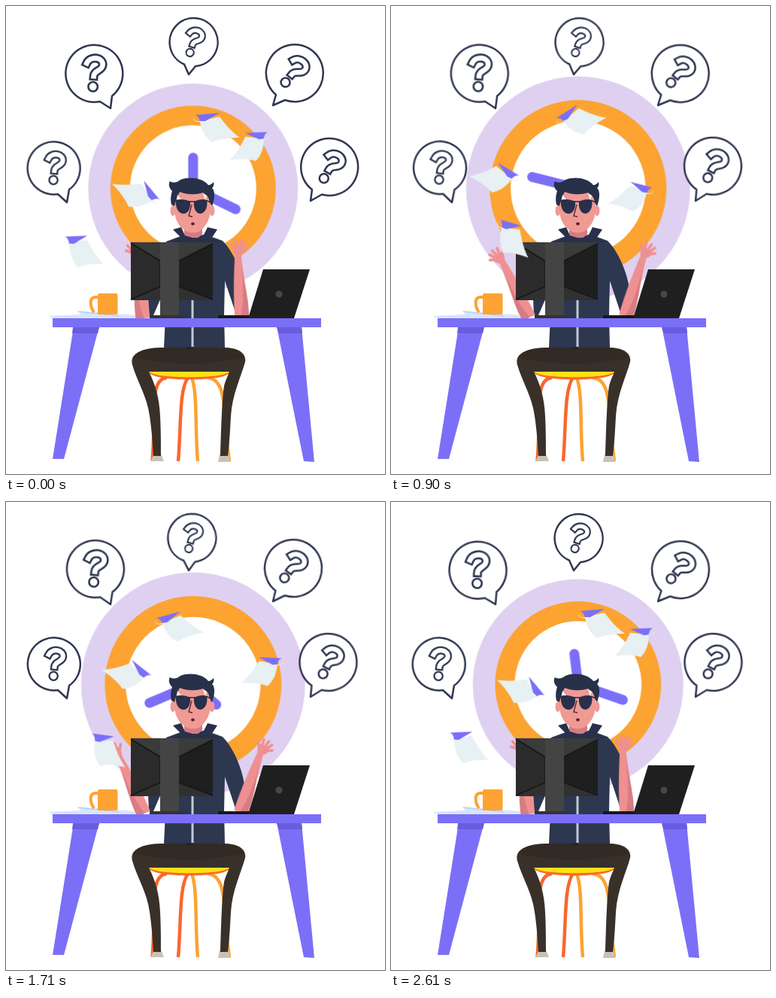
Write an HTML page without scripts that moves like this. It is 504x622 px and loops after 2.7 s.

```html
<!DOCTYPE html>
<html lang="en">
<head>
<meta charset="utf-8">
<title>Overworked at the desk</title>
<style>
html, body { margin: 0; width: 100%; height: 100%; overflow: hidden; background: #fff; }
svg { display: block; width: 504px; height: 622px; }

/* Seven poses per part, held in 90 ms steps */
@keyframes pose {
  0% { transform: var(--a); animation-timing-function: steps(4); }
  13.3333% { transform: var(--b); animation-timing-function: steps(6); }
  33.3333% { transform: var(--c); animation-timing-function: steps(5); }
  50% { transform: var(--d); animation-timing-function: steps(4); }
  63.3333% { transform: var(--e); animation-timing-function: steps(6); }
  83.3333% { transform: var(--f); animation-timing-function: steps(4); }
  96.6667% { transform: var(--g); animation-timing-function: steps(1); }
  100% { transform: var(--a); }
}
.move { animation: pose 2700ms infinite; }

.ring {
  --a: scale(1); --b: scale(1.063); --c: scale(1.068); --d: scale(1);
  --e: scale(1.068); --f: scale(1.07); --g: scale(1.004);
}
.hands {
  --a: rotate(0deg); --b: rotate(41deg); --c: rotate(168deg); --d: rotate(414deg);
  --e: rotate(491deg); --f: rotate(634deg); --g: rotate(713deg);
  stroke: #7b6ff8; stroke-width: 13; stroke-linecap: round;
}
.arm-right {
  --a: rotate(-4deg); --b: rotate(1deg); --c: rotate(16deg); --d: rotate(24deg);
  --e: rotate(18deg); --f: rotate(3deg); --g: rotate(-4deg);
}
.arm-left {
  --a: rotate(-5deg); --b: rotate(-11deg); --c: rotate(-25deg); --d: rotate(-32deg);
  --e: rotate(-23deg); --f: rotate(-13deg); --g: rotate(-5deg);
}

.sheet-top {
  --a: translate(280px, 162px) rotate(0deg); --b: translate(270px, 156px) rotate(-2deg);
  --c: translate(253px, 151px) rotate(-27deg); --d: translate(240px, 162px) rotate(-21deg);
  --e: translate(231px, 166px) rotate(-10deg); --f: translate(260px, 163px) rotate(-2deg);
  --g: translate(280px, 162px) rotate(0deg);
}
.sheet-right {
  --a: translate(324px, 188px) rotate(-8deg); --b: translate(322px, 214px) rotate(-4deg);
  --c: translate(319px, 254px) rotate(9deg); --d: translate(333px, 236px) rotate(4deg);
  --e: translate(341px, 226px) rotate(-3deg); --f: translate(331px, 204px) rotate(-7deg);
  --g: translate(324px, 188px) rotate(-8deg);
}
.sheet-left {
  --a: translate(172px, 249px) rotate(45deg); --b: translate(158px, 244px) rotate(34deg);
  --c: translate(137px, 228px) rotate(26deg); --d: translate(151px, 228px) rotate(26deg);
  --e: translate(160px, 229px) rotate(33deg); --f: translate(166px, 241px) rotate(41deg);
  --g: translate(172px, 249px) rotate(45deg);
}
.sheet-low {
  --a: translate(103px, 327px) rotate(4deg); --b: translate(126px, 320px) rotate(10deg);
  --c: translate(162px, 311px) rotate(22deg); --d: translate(146px, 324px) rotate(18deg);
  --e: translate(135px, 332px) rotate(14deg); --f: translate(116px, 329px) rotate(7deg);
  --g: translate(103px, 327px) rotate(4deg);
}

/* Bubbles sway about the tip of the tail */
.bubble { stroke: #2f3750; stroke-width: 2.5; fill: #fff; stroke-linejoin: round; }
.bubble-1 {
  transform-origin: 81px 261px;
  --a: rotate(-.3deg); --b: rotate(0deg); --c: rotate(1.5deg); --d: rotate(2deg);
  --e: rotate(0deg); --f: rotate(1.5deg); --g: rotate(-.2deg);
}
.bubble-2 {
  transform-origin: 139px 136px;
  --a: rotate(0deg); --b: rotate(1.2deg); --c: rotate(.6deg); --d: rotate(-.6deg);
  --e: rotate(2deg); --f: rotate(-.6deg); --g: rotate(-2.2deg);
}
.bubble-3 {
  transform-origin: 243px 91px;
  --a: rotate(0deg); --b: rotate(-1.3deg); --c: rotate(1.3deg); --d: rotate(2.6deg);
  --e: rotate(-3deg); --f: rotate(-2deg); --g: rotate(0deg);
}
.bubble-4 {
  transform-origin: 355px 132px;
  --a: rotate(0deg); --b: rotate(.2deg); --c: rotate(1.2deg); --d: rotate(2.8deg);
  --e: rotate(-2.4deg); --f: rotate(1.2deg); --g: rotate(1.6deg);
}
.bubble-5 {
  transform-origin: 405px 258px;
  --a: rotate(0deg); --b: rotate(2.4deg); --c: rotate(-2.8deg); --d: rotate(-.5deg);
  --e: rotate(-2.2deg); --f: rotate(1.3deg); --g: rotate(-2.2deg);
}
</style>
</head>
<body>
<svg viewBox="0 0 504 622">
  <defs>
    <path id="hook" d="M-10-11C-6-21 10.500-20 10.500-10C10.500-2 0-3 0 5" fill="none" stroke-linecap="square" stroke-linejoin="round"/>
    <g id="mark">
      <use href="#hook" stroke="#2f3750" stroke-width="11.500"/>
      <use href="#hook" stroke="#fff" stroke-width="6.500"/>
      <circle cy="18.500" r="6"/>
    </g>
    <g id="sheet">
      <path fill="#e7f0f2" d="M-31-15C-30-9-26-8-22-9L4-15C11-5 21 6 31 13C19 13 5 14-6 19C-16 12-20 2-22-8C-28-7-31-10-31-15Z"/>
      <path fill="#7b6ff8" d="M-29-17L4-20L-15-9L-22-9C-23-13-25-16-29-17Z"/>
    </g>
    <g id="arm">
      <path fill="#ee9091" d="M-10 4C-10-28-7-56-4-80H4C5-52 9-24 9 4Z"/>
      <path fill="#d67c82" d="M-2 4C3-14 5-36 3-62C6-42 10-20 9 4Z"/>
      <g transform="rotate(12 0 -80)">
        <path fill="#ee9091" d="M-4-78C-7-83-8-88-6-90L7-91C9-87 8-82 4-78Z"/>
        <path fill="none" stroke="#ee9091" stroke-width="3.600" stroke-linecap="round" d="M-4-84L-11-91M-3-89L-5-97M1-89L2-98M4-88L8-96M5-85L12-90"/>
      </g>
    </g>
  </defs>

  <!-- Clock -->
  <g transform="translate(248.800 242.500)">
    <g class="move ring">
      <circle r="139.500" fill="#dfd0f1"/>
      <circle r="110" fill="#fca331"/>
      <circle r="84" fill="#fff"/>
    </g>
    <g class="move hands">
      <path d="M0 0V-41"/>
      <path d="M0 0V-63" transform="rotate(116)"/>
    </g>
  </g>

  <!-- Question bubbles -->
  <g class="bubble">
    <g class="move bubble-1">
      <path d="M69 250A35 35 0 1 1 84 244L81 261Z"/>
      <use href="#mark" transform="translate(65 214) rotate(6) scale(.94)"/>
    </g>
    <g class="move bubble-2">
      <path d="M125 127A38 38 0 1 1 141 119.500L139 136Z"/>
      <use href="#mark" transform="translate(117 88) rotate(4) scale(1.040)"/>
    </g>
    <g class="move bubble-3">
      <path d="M237 77.500A32 32 0 1 1 252 80L243 91Z"/>
      <use href="#mark" transform="translate(249.500 47) rotate(18) scale(.85)"/>
    </g>
    <g class="move bubble-4">
      <path d="M359 118A38 38 0 1 1 371 125L355 132Z"/>
      <use href="#mark" transform="translate(383 87) rotate(38)"/>
    </g>
    <g class="move bubble-5">
      <path d="M407 244A38 38 0 1 1 420 250.500L405 259Z"/>
      <use href="#mark" transform="translate(432 213) rotate(30)"/>
    </g>
  </g>

  <!-- Stool -->
  <g fill="none" stroke-width="4.500">
    <path stroke="#fa672c" d="M214 494C190 496 200 540 194.500 605M242 494C230 510 233 560 229 605"/>
    <path stroke="#fca331" d="M247 494C255 515 251 560 255 605M268 494C296 496 288 545 297 605"/>
  </g>
  <path fill="#fa672c" d="M190 486H298C297 500 191 500 190 486Z"/>
  <path fill="#ffe116" d="M190 485H298C297 496 191 496 190 485Z"/>

  <!-- Legs and shoes -->
  <g fill="#c9c1b9">
    <path d="M196 597H207L210 605H192Z"/>
    <path d="M284 596H296L298 606H282Z"/>
  </g>
  <path fill="#39302a" d="M205 454H290C310 454 320 462 318 473C313 492 301 515 299 545C298 565 297 582 295 598H285C286 565 287 525 290 505C292 497 295 492 297 486H190C198 502 204 520 205 545C206 565 206 582 206 598H196C195 582 194 565 191 545C188 520 174 498 168 477C164 462 180 455 205 454Z"/>
  <path fill="#2a2421" d="M208 454H290C304 455 314 460 316 468C290 472 270 475 246 476C215 475 190 472 170 467C174 458 190 454 208 454Z" opacity=".45"/>

  <!-- Torso and sleeves -->
  <path fill="#2e3750" d="M232 306L213 313V392L210 454H291L290 410L291 365L306 410L319 390C317 360 304 328 288 312L266 304Z"/>
  <path fill="#2e3750" d="M189 388H206L196 411H190Z"/>
  <path stroke="#c3c8d4" stroke-width="3" d="M248 388V453"/>
  <path fill="#1f263c" d="M240 453H249V457H240Z"/>

  <!-- Arms -->
  <g transform="translate(314 409)"><use class="move arm-right" href="#arm"/></g>
  <g transform="translate(181 411)"><g class="move arm-left"><use href="#arm" transform="scale(-1 1)"/></g></g>

  <!-- Head -->
  <path fill="#d67c82" d="M237 284H261V304L249 312L237 304Z"/>
  <path fill="#28304a" d="M233 294L238 305L248 308H256L263 304L268 294L281 297L273 309L288 314H217L233 308L222 297Z"/>
  <g fill="#f09a94">
    <ellipse cx="222" cy="272" rx="3.500" ry="7"/>
    <ellipse cx="274" cy="272" rx="3.500" ry="7"/>
    <path d="M224 246H272V272C271 286 264 294 258 299C252 302 244 302 239 299C231 294 225 286 224 272Z"/>
  </g>
  <path fill="#28304a" d="M220 264C218 256 220 249 221 246C216 241 216 236 218 233C224 236 228 234 232 231C245 226 262 229 269 238C272 238 274 236 276 234C277 237 276 240 274 242C279 246 277 258 274 266C270 262 271 255 267 252L262 248C250 252 238 250 231 247C228 252 226 258 224 266Z"/>
  <path fill="#fff" d="M228 251L233 257H227ZM262 249L267 252L265 258Z"/>
  <g fill="#28304a">
    <path d="M226 258C232 256 239 257 245 260C246 270 241 277 235 276C229 275 225 268 226 258Z"/>
    <path d="M250 260C256 257 262 256 267 258C269 268 264 275 259 276C253 276 249 270 250 260Z"/>
    <path fill="none" stroke="#28304a" stroke-width="1.500" d="M222 260L228 259L248 260L268 259L274 262"/>
  </g>
  <ellipse cx="248.500" cy="289.500" rx="2.400" ry="1.900" fill="#5b1f2b"/>
  <path fill="none" stroke="#4a2c3e" stroke-width="1.400" d="M247 264L243 279L248 280"/>

  <!-- Desk -->
  <g fill="#7b6ff8">
    <path d="M90 426H124L77 602H62Z"/>
    <path d="M360 426H393L410 606L396 605Z"/>
    <path d="M62 415H419V427H62Z"/>
  </g>
  <path fill="#685ddd" d="M89 427H124L122 435H88ZM360 427H393L394 435H363Z"/>
  <path fill="#d7e5f9" d="M56 412L99 410L95 405L172 411V415H62Z"/>
  <path fill="none" stroke="#b4c9ee" d="M96 406L150 412"/>
  <path fill="none" stroke="#fca331" stroke-width="4" d="M124 387H118C110 388 112 400 117 407"/>
  <rect x="122" y="382" width="26.500" height="28" rx="2" fill="#fca331"/>

  <!-- Monitor -->
  <path fill="#303030" d="M166 314H275V391H166Z"/>
  <path fill="#3b3b3b" d="M166 314H275L230 337H205Z"/>
  <path fill="#2b2b2b" d="M166 316L205 339V373L166 390Z"/>
  <path fill="#1f1f1f" d="M275 316L230 339V373L275 390Z"/>
  <path fill="none" stroke="#171717" stroke-width="1.500" d="M166 315L205 339V373L166 390M275 316L230 339M230 373L275 390"/>
  <path fill="#444" d="M205 314H230V412H205Z"/>
  <path fill="#333" d="M191 411H238V415H191Z"/>

  <!-- Laptop -->
  <path fill="#171717" d="M282 411H326V415H282Z"/>
  <path fill="#1f1f1f" d="M342 350H404L383 415H322Z"/>
  <circle cx="363" cy="383" r="4.500" fill="#474747"/>

  <!-- Flying sheets -->
  <g class="move sheet-top"><use href="#sheet"/></g>
  <g class="move sheet-right"><use href="#sheet" transform="scale(-.92 1)"/></g>
  <g class="move sheet-left"><use href="#sheet" transform="scale(-1 1)"/></g>
  <g class="move sheet-low"><use href="#sheet" transform="scale(.9 1.100)"/></g>
</svg>
</body>
</html>
```
